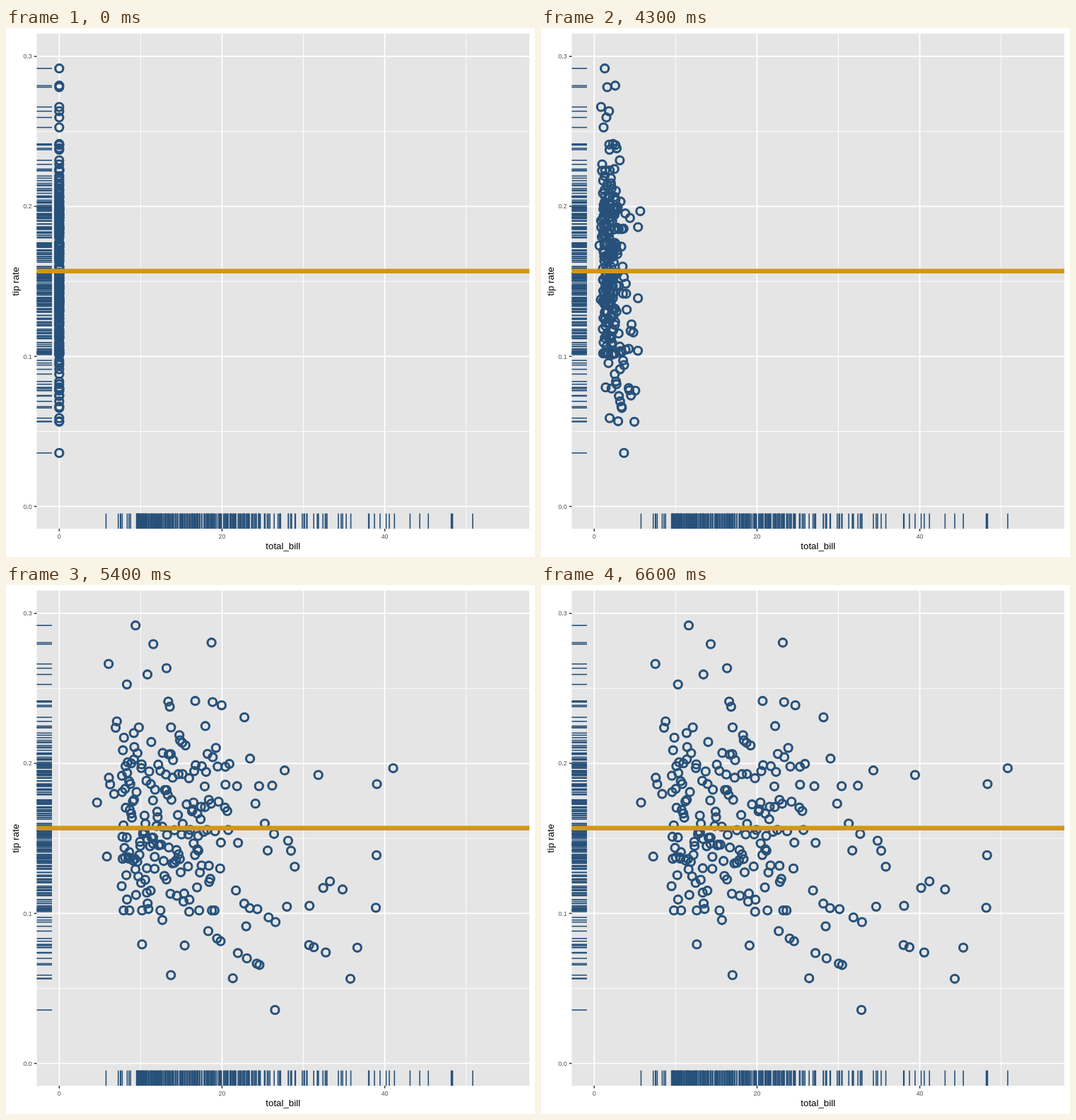
Animation, 748 px wide and 748 px high, one loop 10 s. Source, as an HTML page:

```html
<!DOCTYPE html>
<html lang="en">
<head>
<meta charset="utf-8">
<title>Tip rate by total bill</title>
<style>
  html, body { margin: 0; width: 100%; height: 100%; overflow: hidden; background: #fff; }
  svg { display: block; width: 100vw; height: 100vh; }
  text { font-family: "Liberation Sans", Arial, Helvetica, sans-serif; text-anchor: middle; }
  .tick { font-size: 8.8px; fill: #4d4d4d; }
  .title { font-size: 13.3px; fill: #000; }
  .major { stroke: #fff; stroke-width: 1.7; }
  .minor { stroke: #fff; stroke-width: 0.9; }
  .mark { stroke: #333; stroke-width: 1.5; }
  .rug { stroke: #27517a; stroke-width: 1.6; }
  .dot { fill: none; stroke: #27517a; stroke-width: 3.1; }
  .mean { stroke: #d1961b; stroke-width: 6.4; }
</style>
</head>
<body>
<svg id="stage" viewBox="0 0 748 748"></svg>
<script>
const stage = document.getElementById("stage");
const panel = { left: 43.5, right: 740, top: 8, bottom: 708 };
const rugSize = 21.5;
const meanRate = 0.1569;
const loop = 10000, step = 100, moveStart = 3300, moveSteps = 33;

const px = bill => 75.3 + bill * 11.507;
const py = rate => 676.5 - rate * 2121;

// Bills grouped by the tip that was left
const billsByTip = {
  1: [5.75, 7.25, 12.6, 16.99],
  1.17: [32.83],
  1.44: [7.56, 7.74],
  1.5: [26.41, 12.03, 12.46, 10.65, 19.08, 8.35, 15.69, 11.59],
  1.92: [8.58],
  2: [8.77, 13.37, 16.31, 13.81, 14.52, 11.38, 10.33, 16, 7.51, 24.55, 19.77,
      10.63, 17.89, 30.46, 13, 30.06, 10.09, 24.01, 27.18, 22.67, 28.55],
  2.5: [18.35, 12.54, 11.35, 44.3, 14.26, 16.4, 13.27],
  2.6: [10.29, 28.44],
  3: [19.65, 15.06, 38.01, 17.07, 22.76, 21.16, 28.97, 21.01, 15.38, 14,
      40.55, 38.73, 28.15, 20.45, 18.78],
  3.1: [32.9, 30.14, 26.88, 31.85],
  3.39: [11.61],
  3.48: [13.42],
  3.5: [21.01, 16.97, 22.49, 17.31, 21.5, 45.35, 18.15],
  3.62: [34.64, 24.59],
  4: [27.2, 18.28, 14.31, 38.07, 25.71, 16.82, 23.1, 16.58, 18.71, 20.53],
  4.3: [16.32, 25.21, 25.56, 21.7],
  4.5: [31.71],
  4.7: [25.29, 40.17, 35.83],
  5: [35.26, 31.27, 22.23, 25.28, 32.68, 41.19, 27.05, 48.17, 20.69, 43.11],
  5.17: [34.82, 29.85, 25.89],
  5.62: [30.4, 23.33],
  5.9: [24.71, 29.03],
  6: [32.4],
  6.5: [23.17, 28.17],
  6.7: [48.27, 34.3],
  7.58: [39.42],
  9: [48.33],
  10: [50.81]
};

const points = Object.entries(billsByTip).flatMap(([tip, bills]) =>
  bills.map(bill => ({ bill, rate: tip / bill })));

// Fill the dense middle of the cloud
let seed = 20;
const random = () => (seed = (seed * 16807) % 2147483647) / 2147483647;
const fillers = 241 - points.length;
for (let i = 0; i < fillers; i++) {
  const u = (i + random()) / fillers;
  const spread = (random() + random() + random() - 1.5) * 0.075;
  points.push({ bill: 9.5 + 15 * u ** 1.4, rate: 0.162 + Math.max(-0.06, Math.min(0.062, spread)) });
}

function add(tag, attrs, label) {
  const node = document.createElementNS("http://www.w3.org/2000/svg", tag);
  for (const key in attrs) node.setAttribute(key, attrs[key]);
  if (label !== undefined) node.textContent = label;
  return stage.appendChild(node);
}
const line = (cls, x1, y1, x2, y2) => add("line", { class: cls, x1, y1, x2, y2 });
const across = (cls, y) => line(cls, panel.left, y, panel.right, y);
const down = (cls, x) => line(cls, x, panel.top, x, panel.bottom);

add("rect", {
  x: panel.left, y: panel.top, fill: "#e5e5e5",
  width: panel.right - panel.left, height: panel.bottom - panel.top
});
[0.05, 0.15, 0.25].forEach(rate => across("minor", py(rate)));
[10, 30, 50].forEach(bill => down("minor", px(bill)));
[0, 0.1, 0.2, 0.3].forEach(rate => {
  const y = py(rate);
  across("major", y);
  line("mark", panel.left - 3.7, y, panel.left, y);
  add("text", { class: "tick", x: 30.6, y: y + 3.1 }, rate.toFixed(1));
});
[0, 20, 40].forEach(bill => {
  const x = px(bill);
  down("major", x);
  line("mark", x, panel.bottom, x, panel.bottom + 3.7);
  add("text", { class: "tick", x, y: 722.3 }, bill);
});
add("text", { class: "title", x: 391.7, y: 737.3 }, "total_bill");
add("text", { class: "title", transform: "translate(17.6 358.3) rotate(-90)" }, "tip rate");

const dots = points.map(({ rate }) => add("circle", { class: "dot", cy: py(rate), r: 5.6 }));
points.forEach(({ bill, rate }) => {
  line("rug", px(bill), panel.bottom - rugSize, px(bill), panel.bottom);
  line("rug", panel.left, py(rate), panel.left + rugSize, py(rate));
});
across("mean", py(meanRate));

const easeInOut = p => p < 0.5 ? 4 * p ** 3 : 1 - 4 * (1 - p) ** 3;

function draw(time) {
  const now = Math.floor((time % loop) / step + 1e-6) * step;
  const count = Math.max(0, Math.min(moveSteps, (now - moveStart) / step));
  const share = easeInOut(count / moveSteps);
  dots.forEach((dot, i) => dot.setAttribute("cx", px(points[i].bill * share)));
}

const start = performance.now();
function tick() {
  draw(performance.now() - start);
  requestAnimationFrame(tick);
}
tick();
</script>
</body>
</html>
```
